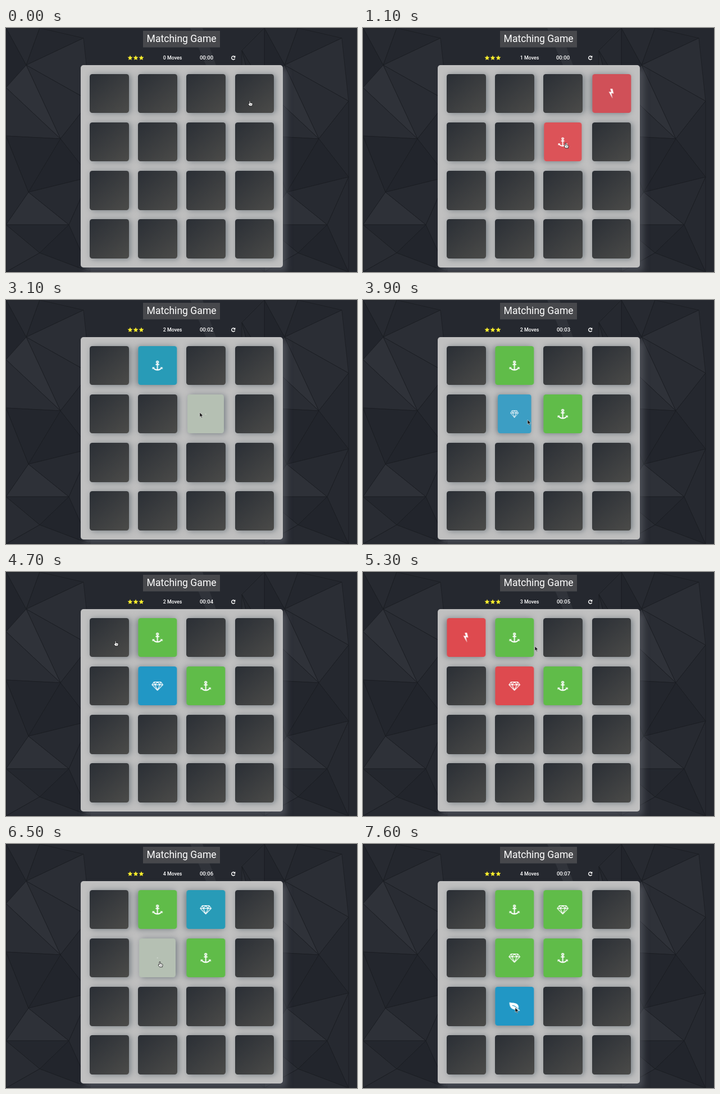
These frames come from a looping animation (625 px wide and 434 px high, 8000 ms). An HTML page:

```html
<!DOCTYPE html>
<html lang="en">
<head>
<meta charset="utf-8">
<title>Matching Game</title>
<style>
  html, body { margin: 0; width: 100%; height: 100%; overflow: hidden; background: #25282f; }
  #stage { position: relative; width: 625px; height: 434px; overflow: hidden; }
  #stage > svg { position: absolute; left: 0; top: 0; }
  text { font-family: Roboto, "Open Sans", sans-serif; fill: #fff; text-anchor: middle; }
  .stat { font-weight: 500; }
  #deck {
    position: absolute; left: 132.7px; top: 65.6px; width: 360.8px; height: 360.4px;
    border-radius: 5px; background: #c0c0c0;
    box-shadow: 6.5px 8px 11px rgba(95, 98, 106, .6);
  }
  .card {
    position: absolute; width: 69.4px; height: 69.4px; border-radius: 4.5px;
    box-shadow: 3px 1px 11px rgba(46, 61, 73, .5);
  }
  .card svg { position: absolute; left: 0; top: 0; width: 100%; height: 100%; overflow: visible; }
  .closed { background-image: linear-gradient(140deg, #2c3036 5%, #4b4b49 100%); }
</style>
</head>
<body>
<div id="stage">
  <svg width="625" height="434" viewBox="0 0 625 434">
    <rect width="625" height="434" fill="#25282f"/>
    <g id="facets" stroke="#1b1d23" stroke-width=".8"></g>
    <path d="M328 0H350L374 66H356Z" fill="#30333a"/>
    <rect x="244" y="5" width="137" height="29.5" fill="#47484c"/>
    <text x="312.6" y="25" font-size="17.6">Matching Game</text>
    <g id="stars" fill="#fdf02c"></g>
    <text id="moves" class="stat" x="296.5" y="56.2" font-size="8.9"></text>
    <text id="clock" class="stat" y="56.2" font-size="9.5"></text>
    <path d="M407 50.9A3.1 3.1 0 1 0 407.6 54.4" fill="none" stroke="#fff" stroke-width="1.4"/>
    <path d="M408.4 49V52.7H404.7Z" fill="#fff"/>
  </svg>
  <div id="deck"></div>
  <svg width="625" height="434" viewBox="0 0 625 434">
    <g id="hand" fill="#fff" stroke="#111" stroke-width=".8" stroke-linejoin="round">
      <path d="M-.9 .8Q0 -.6 .9 .8V4L3.8 4.5Q5.3 4.8 5.1 6.3L4.4 9.8H-.4L-2.8 6.3Q-3 4.8 -.9 5.6Z"/>
      <path d="M1.5 6V8.2M3 6.2V8.2" stroke-width=".5"/>
    </g>
    <path id="arrow" d="M0 0V8.2L1.9 6.5L3.2 9.4L4.6 8.8L3.3 6H5.8Z" fill="#111" stroke="#e6e6e6" stroke-width=".6"/>
  </svg>
</div>
<script>
const LOOP = 8000, STEP = 100, FLIP = 500;
const $ = id => document.getElementById(id);

const OPEN = [33, 151, 197], BAD = [222, 74, 79], MATCH = [96, 188, 73], CLOSED = null;

const ICONS = {
  bolt: `<path fill="#fff" d="M-2.3 -8.6H1.5L3.6 0L-.4 -1L1.7 8.8L-5 -3.4L-.7 -2.8Z" />`,
  anchor: `<g fill="none" stroke="#fff" stroke-width="2">
    <circle cy="-6.3" r="1.7" stroke-width="1.8"/>
    <path d="M0 -4.6V7.6M-3.2 -1.9H3.2M-7 4.2Q-4.6 7.8 0 7.8Q4.6 7.8 7 4.2"/></g>
    <path fill="#fff" d="M-9 2.7H-4.8L-9 6.9ZM9 2.7H4.8L9 6.9Z"/>`,
  gem: `<path fill="none" stroke="#fff" stroke-width="1.2" stroke-linejoin="round"
    d="M-6 -7H6L9.7 -2L0 7.8L-9.7 -2ZM-9.7 -2H9.7M-6 -7L-4.2 -2L0 -7L4.2 -2L6 -7M-4.2 -2L0 7.8L4.2 -2"/>`,
  leaf: `<path fill="#fff" d="M-8.6 -7.4C-6 -5 2 -7.8 6 -2.6C8 .2 7.6 3 6 4.8C2 7.2 -5 6 -7.6 .4C-9 -3.2 -9.2 -5.8 -8.6 -7.4Z"/>
    <path fill="none" stroke="#fff" stroke-width="1.5" stroke-linecap="round" d="M5 4L8.6 7.4"/>
    <path fill="none" stroke="#2197c5" stroke-width="1.1" stroke-linecap="round" d="M-3.6 -1.4Q1.4 -.8 5 3.6"/>`
};

// card position: icon, then [time, new state] steps
const PLAYS = {
  0: ['bolt', [4750, BAD], [5550, CLOSED]],
  1: ['anchor', [2250, OPEN], [3045, MATCH]],
  2: ['gem', [5850, OPEN], [6445, MATCH]],
  3: ['bolt', [280, OPEN], [765, BAD], [1550, CLOSED]],
  5: ['gem', [3635, OPEN], [4750, BAD], [5550, CLOSED], [6445, MATCH]],
  6: ['anchor', [765, BAD], [1550, CLOSED], [3045, MATCH]],
  9: ['leaf', [7060, OPEN]]
};
const MOVES = [765, 3045, 4750, 6445];

// time, x, y, hand shape
const POINTER = [
  [0, 434, 129, 1], [350, 434, 129, 1], [750, 361, 204, 1], [1600, 361, 204, 1],
  [2150, 275, 118, 1], [2350, 275, 118, 0], [2950, 345, 200, 1], [3050, 345, 200, 0],
  [3300, 345, 200, 0], [3600, 288, 206, 1], [3750, 291, 210, 0], [3900, 293, 213, 0],
  [4450, 293, 213, 0], [4700, 195, 122, 1], [4850, 195, 122, 0], [5250, 306, 132, 0],
  [5500, 306, 132, 0], [5800, 350, 122, 1], [6050, 350, 122, 0], [6400, 274, 209, 1],
  [6600, 274, 209, 0], [7000, 271, 291, 1], [7200, 271, 291, 0]
];

// backdrop triangles as point letters, with a shade
const POINTS = {
  A: [0, 0], B: [60, 0], C: [138, 18], D: [36, 66], E: [0, 106], F: [97, 197], G: [150, 130],
  H: [0, 192], I: [40, 292], J: [0, 350], K: [112, 350], L: [150, 265], M: [60, 400], N: [0, 434],
  O: [150, 434], P: [-40, 40], Q: [-40, 250], R: [-40, 400]
};
const FACETS = 'ABD:27 BCD:24 ADE:22 CDG:2b DGF:29 DEF:2f EHF:2a HFI:23 FGL:25 FIL:22 ' +
  'HIJ:26 IKJ:2e IKL:27 JKM:24 JMN:29 KMO:22 KLO:26 MNO:27 APE:26 PEH:24 PHQ:29 QHJ:24 QJR:28 JNR:23';

function drawFacets() {
  const tile = FACETS.split(' ').map(f => {
    const [names, hex] = f.split(':'), v = parseInt(hex, 16);
    const pts = [...names].map(n => POINTS[n].join()).join(' ');
    return `<polygon points="${pts}" fill="rgb(${v},${v + 3},${v + 10})"/>`;
  }).join('');
  $('facets').innerHTML = tile + `<g transform="translate(460 0)">${tile}</g>`;
}

function drawStars() {
  const star = cx => Array.from({ length: 10 }, (_, i) => {
    const r = i % 2 ? 2.1 : 4.7, a = i * Math.PI / 5;
    return [cx + r * Math.sin(a), 53.3 - r * Math.cos(a)].map(n => n.toFixed(2)).join();
  }).join(' ');
  $('stars').innerHTML = [221, 231, 241].map(x => `<polygon points="${star(x)}"/>`).join('');
}

const cards = Array.from({ length: 16 }, (_, i) => {
  const el = document.createElement('div');
  const [icon, ...steps] = PLAYS[i] || [''];
  el.className = 'card closed';
  el.style.left = 16.6 + 86.1 * (i % 4) + 'px';
  el.style.top = 16.4 + 86.1 * Math.floor(i / 4) + 'px';
  el.innerHTML = `<svg viewBox="-34.7 -34.7 69.4 69.4"><g>${ICONS[icon] || ''}</g></svg>`;
  $('deck').append(el);
  return { el, steps, icon: el.querySelector('g') };
});

// cubic-bezier(.25, .1, .25, 1)
function ease(x) {
  if (x <= 0 || x >= 1) return x <= 0 ? 0 : 1;
  const curve = (a, b, s) => 3 * a * s * (1 - s) ** 2 + 3 * b * s * s * (1 - s) + s ** 3;
  let lo = 0, hi = 1;
  for (let i = 0; i < 24; i++) {
    const mid = (lo + hi) / 2;
    if (curve(.25, .25, mid) < x) lo = mid; else hi = mid;
  }
  return curve(.1, 1, lo);
}
const mix = (a, b, p) => a + (b - a) * p;

function drawCard({ el, icon, steps }, t) {
  const past = steps.filter(s => s[0] <= t);
  const [start, now] = past.at(-1) || [-FLIP, CLOSED];
  const before = past.length > 1 ? past.at(-2)[1] : CLOSED;
  const p = ease((t - start) / FLIP);
  const turn = mix(before ? 1 : 0, now ? 1 : 0, p);
  el.classList.toggle('closed', !now);
  const rgb = now && now.map((c, i) => Math.round(before ? mix(before[i], c, p) : c));
  el.style.backgroundColor = now ? `rgba(${rgb},${before ? 1 : p})` : 'transparent';
  el.style.transform = `rotateY(${180 * turn}deg)`;
  icon.setAttribute('transform', `scale(${-turn} ${turn})`);
}

function drawPointer(t) {
  const i = POINTER.findLastIndex(k => k[0] <= t);
  const a = POINTER[i], b = POINTER[i + 1] || a;
  const q = b === a ? 0 : (t - a[0]) / (b[0] - a[0]);
  const p = q * q * (3 - 2 * q);
  const place = `translate(${mix(a[1], b[1], p)} ${mix(a[2], b[2], p)})`;
  for (const [id, on] of [['hand', a[3]], ['arrow', !a[3]]]) {
    $(id).setAttribute('transform', place);
    $(id).style.display = on ? '' : 'none';
  }
}

function render(t) {
  cards.forEach(c => drawCard(c, t));
  drawPointer(t);
  const moves = MOVES.filter(m => m <= t).length;
  const secs = Math.max(0, Math.floor((t - 300) / 1000));
  $('moves').textContent = moves + ' Moves';
  $('clock').textContent = '00:0' + secs;
  $('clock').setAttribute('x', moves === 1 ? 356 : 357);
}

drawFacets();
drawStars();
const begin = performance.now();
function tick() {
  const t = (performance.now() - begin) % LOOP;
  render(Math.floor(t / STEP) * STEP);
  requestAnimationFrame(tick);
}
tick();
</script>
</body>
</html>
```
